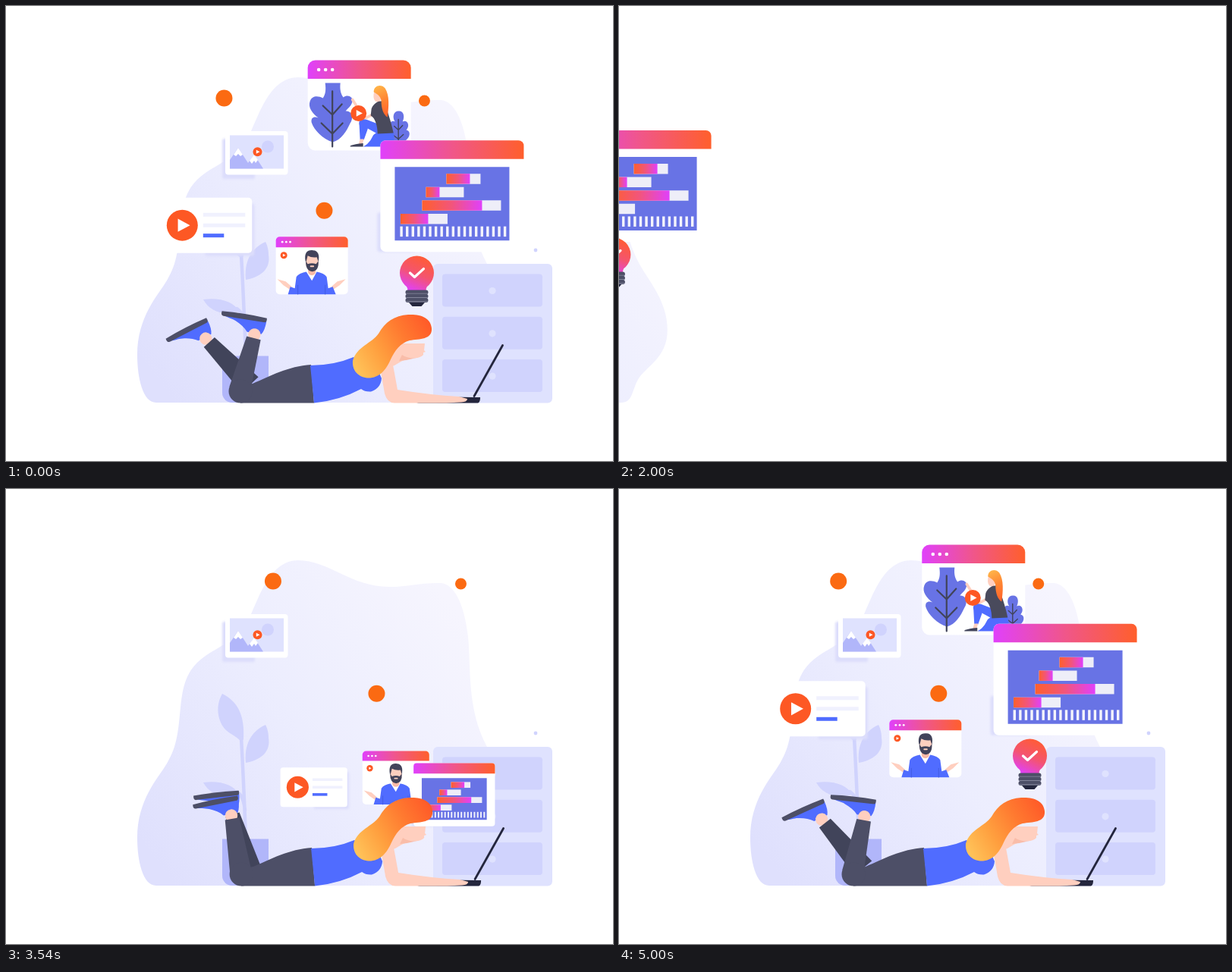
These frames come from a looping animation (800x600 px, 5040 ms). An HTML page with a canvas:

```html
<!DOCTYPE html>
<html lang="en">
<head>
<meta charset="utf-8">
<title>Floating windows</title>
<style>
html, body { margin: 0; width: 100%; height: 100%; overflow: hidden; background: #fff; }
canvas { display: block; }
</style>
</head>
<body>
<canvas id="stage" width="800" height="600"></canvas>
<script>
const ctx = document.getElementById('stage').getContext('2d');
const LOOP = 5040, WRAP = 2090;
const ORANGE = '#fd5824', PINK = '#e040fb', BLUE = '#506cff', INDIGO = '#6873e5';
const SKIN = '#ffcfbf', DARK = '#4d4f67', DARKER = '#41445a', INK = '#24263d';
const PALE = '#dfe2fe', LILAC = '#d0d3fd', MAUVE = '#b1b6fa', GEM = '#fb6a12';

// Motion rules; the timeline runs from WRAP to WRAP + LOOP.
const clamp = v => Math.min(1, Math.max(0, v));
const smooth = u => { u = clamp(u); return u * u * (3 - 2 * u); };
const arrive = (t, end) => 250 * (Math.max(0, end - t) / 746) ** 2.5;
const leave = (t, start) => -6e-6 * Math.max(0, t - start) ** 3;
const settle = t => 2 ** ((4420 - t) / 600);
const backOut = u => 1 + 2.7 * (u - 1) ** 3 + 1.7 * (u - 1) ** 2;

const gems = [
  { x: 287.5, y: 121.5, r: 11, drift: .043, end: 3413, out: 6400 },
  { x: 551.5, y: 125, r: 7.5, drift: .032, end: 3290, out: 6600 },
  { x: 419.5, y: 269.7, r: 11, drift: .046, end: 3501, out: 6420 }
];
// Each window pops out at "from", then glides by "glide" towards "rest".
const windows = [
  { draw: card, start: 3270, out: 6300, from: [495, 430], rest: [253.8, 276], glide: [17.4, 27] },
  { draw: presenter, start: 3076, out: 6400, from: [634, 457], rest: [389, 340], glide: [29, 4.5] },
  { draw: studio, start: 3600, out: 6590, from: [560, 450], rest: [431.5, 88.5], glide: [70, 87] },
  { draw: editor, start: 3346, out: 6588, from: [584, 447], rest: [584.5, 236], glide: [7, 30] }
];

function fill(d, c) {
  ctx.fillStyle = c;
  ctx.fill(new Path2D(d));
}
function line(d, c, w) {
  ctx.strokeStyle = c;
  ctx.lineWidth = w;
  ctx.lineCap = ctx.lineJoin = 'round';
  ctx.stroke(new Path2D(d));
}
function box(x, y, w, h, r, c) {
  ctx.beginPath();
  ctx.roundRect(x, y, w, h, r);
  ctx.fillStyle = c;
  ctx.fill();
}
function dot(x, y, r, c) {
  ctx.beginPath();
  ctx.arc(x, y, r, 0, 7);
  ctx.fillStyle = c;
  ctx.fill();
}
function lin(x0, y0, x1, y1, ...cols) {
  const g = ctx.createLinearGradient(x0, y0, x1, y1);
  cols.forEach((c, i) => g.addColorStop(i / (cols.length - 1), c));
  return g;
}
function at(x, y, draw, s = 1, deg = 0) {
  ctx.save();
  ctx.translate(x, y);
  ctx.rotate(deg * Math.PI / 180);
  ctx.scale(s, s);
  draw();
  ctx.restore();
}
function shade(x, y, w, h) {
  ctx.save();
  ctx.filter = 'blur(1.5px)';
  box(x, y, w, h, 3, '#dcddfb');
  ctx.restore();
}
function play(x, y, r) {
  dot(x, y, r, ORANGE);
  at(x, y, () => fill('M-.28-.42 .5 0-.28.42Z', '#fff'), r);
}

function blob() {
  fill('M198 523C180 523 173 490 173 460C173 410 200 382 212 362C240 318 218 262 252 229C274 208 305 203 320 172C334 142 348 94 385 94C425 94 455 129 505 129C530 129 550 123 573 124C590 125 604 150 609 195C613 235 607 290 634 340C648 365 671 390 671 427C671 465 642 475 632 493C624 508 625 523 610 523Z',
    lin(190, 480, 600, 170, '#dfe0fd', '#ecedfe', '#f6f5fe'));
}
function plant() {
  fill('M285 270C276 285 278 306 290 318C298 325 306 327 310 334L313 330C315 300 306 280 285 270Z', LILAC);
  fill('M342 311C322 320 314 338 316 361C338 357 349 345 346 328C346 320 344 315 342 311Z', LILAC);
  fill('M260 387C268 402 285 409 307 403C301 390 282 384 260 387Z', LILAC);
  line('M310 328Q313 380 316 462M304 399Q313 404 315 424', LILAC, 4.5);
  box(285, 461.5, 61, 61.5, [0, 0, 13, 13], MAUVE);
}
function picture() {
  shade(285, 175, 43, 53);
  box(289, 165, 82.5, 57.5, 4, '#fff');
  box(295, 170.5, 71, 44, 0, PALE);
  dot(345, 185.5, 8, LILAC);
  fill('M295 214.5V203L306 187 319 207 327 196 339 214.5Z', MAUVE);
  fill('M306 187L312 196 309 198 306 195 303 198 300 196ZM327 196L332 203 329 207 327 204 324 208 321 204Z', '#fff');
  play(331.5, 192.3, 6);
}
function dresser() {
  dot(698, 322, 2.4, LILAC);
  box(563, 340, 157, 183.5, 6, PALE);
  for (let i = 0; i < 3; i++) {
    const y = 353.5 + i * 56.3;
    box(575, y, 132, 43, 4, LILAC);
    dot(641, y + 22, 4.6, PALE);
  }
}

function frame(w, h, bar, r) {
  box(0, 0, w, h, r, '#fff');
  box(0, 0, w, bar, [r, r, 0, 0], lin(0, 0, w, 0, PINK, '#f0568a', '#ff5f2c'));
}
function dots(x, y, r, gap) {
  for (let i = 0; i < 3; i++) dot(x + i * gap, y, r, '#fff');
}
function card() {
  ctx.translate(-62, -36.5);
  shade(62, 8, 65, 69);
  box(0, 0, 124, 73, 5, '#fff');
  play(32, 36.5, 20.5);
  box(59.5, 20, 55.5, 5, 0, '#f0f1fe');
  box(59.5, 34, 55.5, 5, 0, '#f0f1fe');
  box(59.5, 47.5, 27.5, 5, 0, BLUE);
}
function presenter() {
  ctx.translate(-47.5, -38);
  frame(95, 76, 14, 5);
  dots(8.5, 7, 1.4, 5.2);
  play(10.5, 24.5, 4.5);
  fill('M2 56L13 59 21 66 19 70 10 64ZM92 56L81 59 73 66 75 70 84 64Z', SKIN);
  fill('M16 76L19 66 25 68 27 53Q30 48 41 46H53Q64 48 67 53L69 68 75 66 79 76Z', BLUE);
  line('M29 64V76M65 64V76', '#3f59dc', .8);
  fill('M40 46L47 41 54 46 47.5 58Z', '#fff');
  box(42.5, 38, 10, 13, 5, '#f8b9a6');
  box(39.5, 20, 16.5, 24, 8, SKIN);
  fill('M39 32C37 21 42 17 49 18C56 18 58 25 56 33L54 27Q47 28 42 25L40 33Z', '#42435a');
  fill('M39.5 32L42 36Q47.5 34 53 36L56 32Q57 45 48 46Q39 45 39.5 32Z', '#42435a');
  box(45, 38, 5.5, 2, 1, SKIN);
}
function studio() {
  ctx.translate(-68, -59.5);
  frame(136, 119, 24.5, 10);
  dots(14.5, 12.5, 2.3, 9);
  fill('M23 30H43C42 40 44 45 47 49C53 44 62 49 58 57C56 62 52 64 50 67C58 66 61 76 56 83C51 94 44 105 33 108C20 104 8 92 5 82C4 75 9 74 14 76C6 70 0 62 3 54C6 46 14 47 20 50C24 44 24 38 23 30Z', INDIGO);
  line('M32.5 41V114M20 60L32.5 72 45 58M18 83L32.5 97 46 83', DARKER, 2.2);
  fill('M120 67C127 67 128 75 125 81C132 78 135 87 130 92C136 93 135 101 130 105L120 113 109 104C104 99 105 92 111 92C106 86 109 78 115 81C111 75 113 67 120 67Z', INDIGO);
  line('M119.5 78V114M114 87L119.5 92 125 86M113 99L119.5 104 126 98', DARKER, 1.4);
  line('M87 71L75 77 59 52', SKIN, 3.6);
  fill('M68 86C66 77 73 76 82 80L111 91C118 103 112 114 101 114H73C82 110 85 101 88 96L79 91 74 105 69 105Z', BLUE);
  fill('M79 90L90 96 80 103Z', '#fff');
  fill('M69 104H74L72 111H67Z', SKIN);
  fill('M56 113Q62 110 73 109.5V114H56Z', DARKER);
  fill('M88 40Q85 50 89 54L94 56 98 48 96 38Z', SKIN);
  fill('M84 64C87 56 94 53 101 54C104 66 110 80 113 96L92 97C92 87 89 76 83 73Z', '#494a5c');
  fill('M87 42C87 33 97 31 102 37C108 46 107 62 105 75C100 72 97 64 97 54C96 47 92 45 87 42Z',
    lin(88, 35, 105, 72, '#ffb64a', '#ff8632', '#ff642b'));
  play(67, 70, 10.5);
}
function clip(row, x, done, rest) {
  const y = 44 + row * 17.6;
  box(x, y, done + rest, 13.5, 0, '#eeeef8');
  box(x, y, done, 13.5, 0, lin(x, 0, x + done, 0, '#ff5f2c', '#f2557c', PINK));
}
function editor() {
  ctx.translate(-94.5, -73.5);
  shade(-4, 95, 50, 52);
  frame(189, 147, 24.5, 7);
  box(19, 35, 151, 97, 0, INDIGO);
  clip(0, 87, 31, 14);
  clip(1, 60, 18, 32);
  clip(2, 55, 79, 25);
  clip(3, 26.5, 36.5, 25.5);
  for (let i = 0; i < 19; i++) box(26 + i * 7.58, 113.5, 3.4, 13.5, 0, '#f4f4fc');
}
function bulb() {
  const glow = lin(12, -20, -8, 24, '#ff5c35', '#f4546f', PINK);
  dot(0, 0, 22.5, glow);
  fill('M-18 13Q-12 17-12 24H12Q12 17 18 13Z', glow);
  line('M-9 0L-3 5.5 9-5.5', '#fff', 3.2);
  fill('M-14 35H14L6 44H-6Z', INK);
  for (let i = 0; i < 3; i++) {
    box(-15, 22.5 + i * 5.3, 30, 6, 3, DARK);
    box(-14, 26.8 + i * 5.3, 28, .9, 0, '#8b8da2');
  }
}

function leg(x, y, len, deg, tilt, shin, color) {
  const a = deg * Math.PI / 180;
  at(x + len * Math.sin(a), y - len * Math.cos(a), () => {
    fill('M-46-20C-38-16-33-17-27-14C-20-11-14-7-10-2H9Q13-8 13-20Z', BLUE);
    fill('M-47-24Q-48-18-44-18H11Q14-19 13-24Q-18-26-47-24Z', DARK);
  }, 1, tilt);
  at(x, y, () => {
    dot(0, -len, 8.2, SKIN);
    fill(shin, color);
  }, 1, deg);
}
function woman(t) {
  // Kicks swing evenly; the first ones run a little behind.
  const phase = .24 * (t - 4420) - 52 * smooth((4420 - t) / 700);
  const p = (1 - Math.cos(phase * Math.PI / 180)) / 2;
  const far = 27 - 71 * p, near = -44 + 66 * p;
  leg(313, 500, 79, far, 3.6 + .79 * far, 'M-9-72L10-73 22 4-8 6Z', DARKER);
  leg(305, 505, 75, near, -5.5 + .836 * near, 'M-9-70L10-71 17-5 14 10-11 0Z', DARK);
  fill('M402 473C372 475 348 488 325 498L309 500V523.5H406Z', DARK);
  dot(309, 508, 15.5, DARK);

  fill('M617 516L585 515.5 541 523.5H622Q625 523 625 516Z', INK);
  line('M617 514.5L654.5 447.5', INK, 2.8);
  fill('M492 470L508 463 512 484 516 506Q560 513 597 515L608 518Q608 522 600 522.5L580 523.5H512Q502 523 499 511Z', SKIN);
  fill('M508 445H552L551 454 553 456 550 457V460Q546 465 535 464Q524 466 512 474L500 478Z', SKIN);
  fill('M522 460Q528 465 541 464Q530 467 518 468Z', '#f9bda9');
  fill('M401 474Q432 474 458 463L490 480 495 491Q494 504 481 508.5Q473 509 468 505Q440 520 406 523.5Z', BLUE);
  fill('M561 425C560 411 546 406 530 407C512 408 499 417 491 432C482 445 462 449 457 468C456 484 468 491 480 490.5C495 489 502 477 507 466C512 455 520 444 532 441C545 439 562 440 561 425Z',
    lin(460, 480, 560, 420, '#ffc45a', '#ffa03f', '#ff7a30', '#ff5a28'));
}

function popWindow(w, t) {
  const k = (1 - clamp((t - w.start) / 800)) ** 1.5;
  if (k === 1) return;
  const [x, y] = w.rest.map((r, i) => {
    const p = r + w.glide[i] * settle(t);
    return p + (w.from[i] - p) * k;
  });
  at(x + leave(t, w.out), y, w.draw, 1 - k * k);
}
function popBulb(t) {
  const u = clamp((t - 3956) / 800), drift = Math.max(0, t - LOOP);
  if (u === 0) return;
  const s = Math.max(0, backOut(u));
  at(541.5 - .0324 * drift + leave(t, 6609), 352 - 40 * (s - 1) - .012 * drift, bulb, s);
}

function render(ms) {
  const now = ms % LOOP, t = now < WRAP ? now + LOOP : now;
  const slide = (end, out, draw) => at(arrive(t, end) + leave(t, out), 0, draw);
  ctx.fillStyle = '#fff';
  ctx.fillRect(0, 0, 800, 600);
  slide(3172, 6575, blob);
  slide(3284, 6150, plant);
  slide(3284, 6170, picture);
  slide(3134, 5940, dresser);
  for (const w of windows) popWindow(w, t);
  popBulb(t);
  for (const g of gems) {
    dot(g.x - g.drift * (t - LOOP) + arrive(t, g.end) + leave(t, g.out), g.y, g.r, GEM);
  }
  slide(3626, 6020, () => woman(t));
}
function loop() {
  render(performance.now());
  requestAnimationFrame(loop);
}
loop();
</script>
</body>
</html>
```
